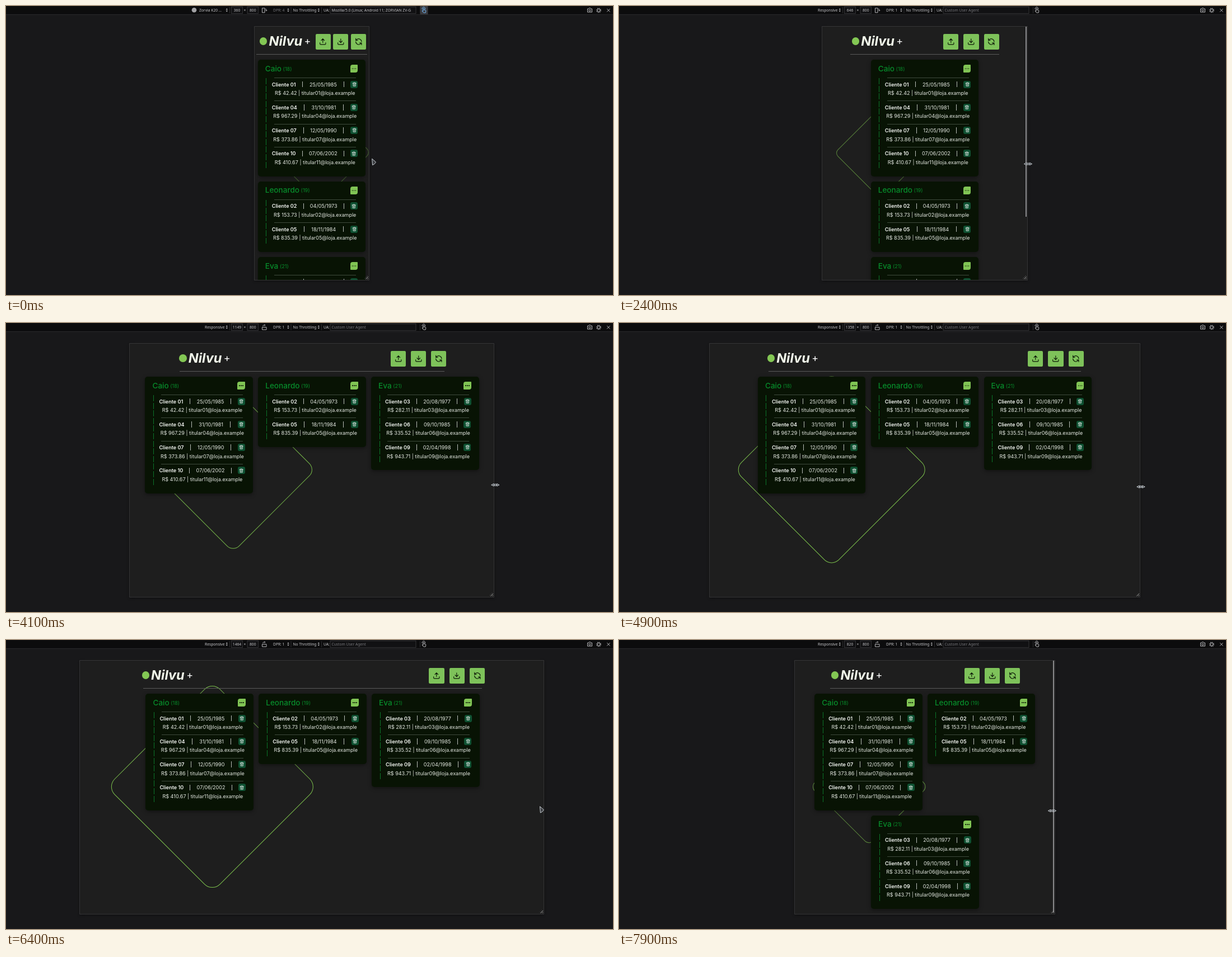
These frames come from a looping animation (1084 by 517 pixels, 8 s). An HTML page:

```html
<!DOCTYPE html>
<html lang="pt-BR">
<head>
<meta charset="utf-8">
<title>Responsive preview</title>
<style>
  html, body { margin: 0; width: 100%; height: 100%; overflow: hidden; background: #18181a; }
  body { position: relative; font: 9.05px Inter, sans-serif; color: #e4e8e2; }
  body > svg, .abs, .card, .card * { position: absolute; }
  body > svg { left: 0; top: 0; }
  #bar { font: 6.7px "Noto Sans", sans-serif; fill: #c6c6c9; }
  #bar .box { fill: #111113; stroke: #3c3c40; stroke-width: .8; }
  #bar .line { fill: none; stroke: #c6c6c9; stroke-width: .9; }
  #bar .dim { fill: #77777b; }
  #page { top: 36.5px; height: 453px; box-sizing: border-box; overflow: hidden;
    background: #1e1e1e; box-shadow: 0 0 0 .8px #3d3d3f, 0 2px 5px #0007; }
  #origin { left: 50%; top: -36.5px; }
  #deco { box-sizing: border-box; border: 1px solid #7cc04c; border-radius: 7.5%; transform: rotate(45deg); }
  #rule { top: 86.3px; height: .8px; background: #5a5a5a; }
  #mark { top: 56.2px; width: 13.5px; height: 13.5px; border-radius: 50%; background: #83c754; }
  #brand { top: 47px; font: italic 700 23.5px/32px Inter, sans-serif; color: #f2f7ea; }
  #plus { top: 52.5px; font: 400 18px/19px Inter, sans-serif; color: #fff; width: 20px; text-align: center; }
  .tool { top: 50.4px; width: 27.2px; height: 27.2px; border-radius: 2.2px; background: #7ec25a; }
  .tool svg { position: absolute; left: 6.8px; top: 6.8px; }
  .icon { fill: none; stroke: currentColor; stroke-linecap: round; stroke-linejoin: round; stroke-width: 2; }
  .tool, .more { color: #0b1606; }
  .card { width: 192.5px; border-radius: 5px; background: #081304; box-shadow: 0 2px 7px #0006; }
  .card h2 { margin: 0; left: 13px; top: 6.5px; font: 500 13.57px/19px Inter, sans-serif; color: #078c2b; white-space: nowrap; }
  .card h2 small { position: static; font-size: 9.05px; font-weight: 400; margin-left: 2.6px; vertical-align: 1px; }
  .more { left: 165px; top: 9.3px; width: 13.5px; height: 13.5px; border-radius: 4px 1px 4px 1px; background: #80c454; }
  .more i { top: 6px; width: 1.7px; height: 1.7px; border-radius: 50%; background: #0b1606; }
  .rail { left: 14.5px; top: 33px; width: 1px;
    background: repeating-linear-gradient(#0b7429 0 11px, transparent 11px 13.6px); }
  .row { left: 0; width: 204px; height: 41px; }
  .row::before { content: ""; position: absolute; left: 29px; width: 146px; height: .8px; background: #3e4a3c; }
  .row div { left: 25px; top: 3px; width: 153.5px; height: 18px; display: flex; justify-content: space-between; align-items: center; }
  .row div > * { position: relative; }
  .row b { font-weight: 600; color: #f5f7f4; }
  .row u { width: 1px; height: 10.5px; background: #b9bdb8; }
  .row em { width: 13px; height: 13px; border-radius: 3px; background: #0f5132; color: #fff; }
  .row em svg { left: 2.3px; top: 2.3px; }
  .row p { margin: 0; top: 19px; width: 204px; line-height: 18px; text-align: center; white-space: nowrap; }
  #thumb { top: 0; right: .5px; width: 2px; background: #8b8b8e; }
  #grip { right: 1px; bottom: 1px; width: 7px; height: 7px; clip-path: polygon(100% 0, 100% 100%, 0 100%);
    background: repeating-linear-gradient(135deg, #aaa 0 .8px, transparent .8px 2px); }
  #pointer { fill: #3c3e42; stroke: #d6dde2; stroke-width: .9; stroke-linejoin: round; }
</style>
</head>
<body>
<svg id="bar" width="1084" height="517">
  <rect width="1084" height="15" fill="#0c0c0d"/>
  <path d="M0 15.3H1084" stroke="#303033" stroke-width=".8"/>
  <path d="M399.5 2v11M509 2v11M563.5 2v11M739.5 2v11" stroke="#343438" stroke-width=".8"/>
  <rect class="box" x="402.5" y="1.5" width="20" height="12"/>
  <rect class="box" x="431" y="1.5" width="19.5" height="12"/>
  <rect class="box" x="579" y="1.5" width="153" height="12"/>
  <g id="device">
    <circle cx="336" cy="7.3" r="4.3" fill="#a2a2a5"/>
    <text x="345" y="10">Zorvia K20 ...</text>
  </g>
  <text id="responsive" x="355" y="10">Responsive</text>
  <text id="width" x="412.5" y="10" text-anchor="middle"></text>
  <text x="426.5" y="10" text-anchor="middle">×</text>
  <text x="440.8" y="10" text-anchor="middle">800</text>
  <path id="turn" class="line"/>
  <text id="dpr" x="477" y="10"></text>
  <text x="512.5" y="10">No Throttling</text>
  <path d="M392.6 6.5l1.7-2.2 1.7 2.2zm0 1.8l1.7 2.2 1.7-2.2zM502.3 6.5l1.7-2.2 1.7 2.2zm0 1.8l1.7 2.2 1.7-2.2zM556.6 6.5l1.7-2.2 1.7 2.2zm0 1.8l1.7 2.2 1.7-2.2z"/>
  <text x="567" y="10">UA:</text>
  <text id="agent" x="581.5" y="10"></text>
  <rect id="touchBack" x="739.5" width="14" height="15" fill="#39393d"/>
  <path id="touch" class="line" d="M745 9V4.6q1-1.2 1.8 0V7l2.4.6q.8.2.6 1.2l-.6 3.2h-3.6l-2.6-3.2q.6-1 2 .2M743.4 6a2.8 2.8 0 1 1 5 0"/>
  <g class="line">
    <path d="M1038.5 5h2l.8-1.3h2.4l.8 1.3h2v6h-8z"/><circle cx="1042.5" cy="7.9" r="1.7"/>
    <circle cx="1058.5" cy="7.8" r="2.4"/>
    <circle cx="1058.5" cy="7.8" r="3.7" stroke-width="1.3" stroke-dasharray="1.4 1.506"/>
    <path d="M1073.2 5l5.4 5.4m0-5.4l-5.4 5.4"/>
  </g>
</svg>

<div id="page" class="abs">
  <div id="origin" class="abs">
    <div id="deco" class="abs"></div>
    <div id="rule" class="abs"></div>
    <div id="mark" class="abs"></div>
    <div id="brand" class="abs">Nilvu</div>
    <div id="plus" class="abs">+</div>
  </div>
  <div id="thumb" class="abs"></div>
  <div id="grip" class="abs"></div>
</div>

<svg id="pointer" width="1084" height="517">
  <g id="cursor">
    <path id="arrow" d="M-3.3-5.7L3.6.3 1.2 3.4-2.4 5.6z"/>
    <path id="resize" d="M-7.2 0l4.6-2.2v4.4zM7.2 0L2.6-2.2v4.4zM-1.7 0a1.7 1.7 0 1 0 3.4 0a1.7 1.7 0 1 0-3.4 0"/>
  </g>
</svg>

<script>
const $ = id => document.getElementById(id);
const CENTER = 546, SCALE = 0.5657, CARD = 192.5, PITCH = 201.8, GAP = 9.3, ROW = 41.25;

const icon = (size, d) =>
  `<svg class="icon" width="${size}" height="${size}" viewBox="0 0 24 24"><path d="${d}"/></svg>`;
const TRAY = 'M3 15v4a2 2 0 0 0 2 2h14a2 2 0 0 0 2-2v-4';
const TRASH = 'M3 6h18M8 6V3h8v3M5 6l1 15h12l1-15M10 11v6M14 11v6';

const add = (className, html) => {
  const el = document.createElement('div');
  el.className = className;
  el.innerHTML = html;
  $('origin').append(el);
  return el;
};

const tools = [
  'M12 15V3M7 8l5-5 5 5' + TRAY,
  'M12 3v12M7 10l5 5 5-5' + TRAY,
  'M3 2v6h6M21 12A9 9 0 0 0 6 5.3L3 8M21 22v-6h-6M3 12a9 9 0 0 0 15 6.7l3-2.7'
].map(d => add('tool abs', icon(13.6, d)));

const rowHtml = ([id, date, value, mail = id], i) => `
  <div class="row" style="top:${32 + i * ROW}px">
    <div><b>Cliente ${id}</b><u></u><span>${date}</span><u></u><em>${icon(8.4, TRASH)}</em></div>
    <p>R$ ${value} | titular${mail}@loja.example</p>
  </div>`;

const cards = [
  ['Caio', 18, [['01', '25/05/1985', '42.42'], ['04', '31/10/1981', '967.29'],
    ['07', '12/05/1990', '373.86'], ['10', '07/06/2002', '410.67', '11']]],
  ['Leonardo', 19, [['02', '04/05/1973', '153.73'], ['05', '18/11/1984', '835.39']]],
  ['Eva', 21, [['03', '20/08/1977', '282.11'], ['06', '09/10/1985', '335.52'], ['09', '02/04/1998', '943.71']]]
].map(([name, count, rows]) => {
  const height = 43.5 + rows.length * ROW;
  const dots = [3, 6, 9].map(x => `<i style="left:${x}px"></i>`).join('');
  const el = add('card', `<h2>${name}<small>(${count})</small></h2><div class="more">${dots}</div>
    <div class="rail" style="height:${rows.length * ROW - 4}px"></div>${rows.map(rowHtml).join('')}`);
  el.style.height = height + 'px';
  return { el, height };
});

// time, viewport width, pointer x, pointer y, layout lag
const KEYS = [
  [0, 360, 657, 279, 0], [100, 360, 657, 279, 0], [400, 360, 653, 279, 0], [500, 360, 653, 279, 0],
  [600, 360, 648, 278, 0], [1000, 360, 648, 278, 0], [2400, 646, 730.5, 282.5, 0], [2600, 646, 730.5, 282.5, 0],
  [3500, 950, 821.5, 287, 1.5], [4400, 1248, 900, 291, 0], [4900, 1358, 932, 293, 0], [5300, 1453, 958, 296, 0],
  [5900, 1528, 977, 299, 0], [6100, 1528, 977, 299, 0], [6400, 1464, 956.8, 303.5, 1.5],
  [7000, 1199, 876, 303, 0], [7100, 1150, 863.5, 303, 0], [7900, 820, 773.5, 305.5, 0.3]
];

function sample(t) {
  const next = Math.max(1, KEYS.findIndex(k => k[0] >= t));
  const a = KEYS[next - 1], b = KEYS[next];
  const f = (t - a[0]) / (b[0] - a[0]);
  return a.map((v, i) => v + (b[i] - v) * f);
}

const setX = (el, x) => { el.style.left = x + 'px'; };
const show = (el, on) => { el.style.display = on ? '' : 'none'; };

function layoutHeader(size, compact) {
  const half = compact ? 95.5 : 0.375 * size - 5;
  const middle = compact ? 1.5 : 0.8;
  const left = middle - half;
  const ruleWidth = size * (compact ? 0.97 : 0.727);
  setX($('rule'), -ruleWidth / 2);
  $('rule').style.width = ruleWidth + 'px';
  setX($('mark'), left + 1);
  setX($('brand'), left + 17.5);
  setX($('plus'), left + 76.5);
  tools.forEach((el, i) => setX(el, middle + half - 27.2 - (2 - i) * (compact ? 31.6 : 36.2)));
}

function layoutDeco(size, compact) {
  const reach = size * (compact ? 0.4265 : 0.2177);
  const side = reach / 0.676;
  const tip = compact ? size / 2 : 1;
  Object.assign($('deco').style, {
    left: tip - reach - side / 2 + 'px', top: 262.5 - side / 2 + 'px',
    width: side + 'px', height: side + 'px', opacity: Math.min(1, 0.25 + size / 950)
  });
}

function layoutCards(size) {
  const columns = size >= 606 ? 3 : size >= 404 ? 2 : 1;
  let top = 96;
  for (let i = 0; i < cards.length; i += columns) {
    const line = cards.slice(i, i + columns);
    line.forEach(({ el }, j) => {
      setX(el, (j - (line.length - 1) / 2) * PITCH - CARD / 2);
      el.style.top = top + 'px';
    });
    top += Math.max(...line.map(c => c.height)) + GAP;
  }
  return columns;
}

function drawToolbar(width, device) {
  show($('device'), device);
  show($('responsive'), !device);
  show($('touchBack'), device);
  $('touch').style.stroke = device ? '#75bfff' : '';
  $('width').textContent = Math.round(width);
  $('dpr').textContent = device ? 'DPR: 4' : 'DPR: 1';
  $('dpr').setAttribute('class', device ? 'dim' : '');
  $('agent').textContent = device ? 'Mozilla/5.0 (Linux; Android 11; ZORVIAN ZV-G' : 'Custom User Agent';
  $('agent').setAttribute('class', device ? '' : 'dim');
  $('turn').setAttribute('d', width > 800
    ? 'M457.5 7.5h7.5v4.5h-7.5zM458.5 5.8q.3-2 2.4-2h2m-1.4-1.3l1.4 1.3-1.4 1.3'
    : 'M457.5 3.8h4.5v8h-4.5zM463.2 5q1.7.2 1.7 2v2m-1.3-1.4l1.3 1.4 1.3-1.4');
}

function draw(now) {
  const t = Math.floor(now % 8000 / 100) * 100;
  const [, width, x, y, lag] = sample(t);
  const size = width * SCALE, compact = width < 480, device = t < 1100;

  $('page').style.width = size + 'px';
  setX($('page'), CENTER - size / 2);
  $('origin').style.marginLeft = lag + 'px';
  layoutHeader(size + 2 * lag, compact);
  layoutDeco(size, compact);
  const columns = layoutCards(size);

  show($('thumb'), !device && (columns === 1 || (columns === 2 && t > 7000)));
  $('thumb').style.height = (columns === 1 ? 340 : 450) + 'px';
  drawToolbar(width, device);

  const arrow = t < 600 || (t >= 6200 && t <= 6500);
  show($('arrow'), arrow);
  show($('resize'), !arrow);
  $('cursor').setAttribute('transform', `translate(${x} ${y})`);
}

function tick() {
  draw(performance.now());
  requestAnimationFrame(tick);
}
tick();
</script>
</body>
</html>
```
